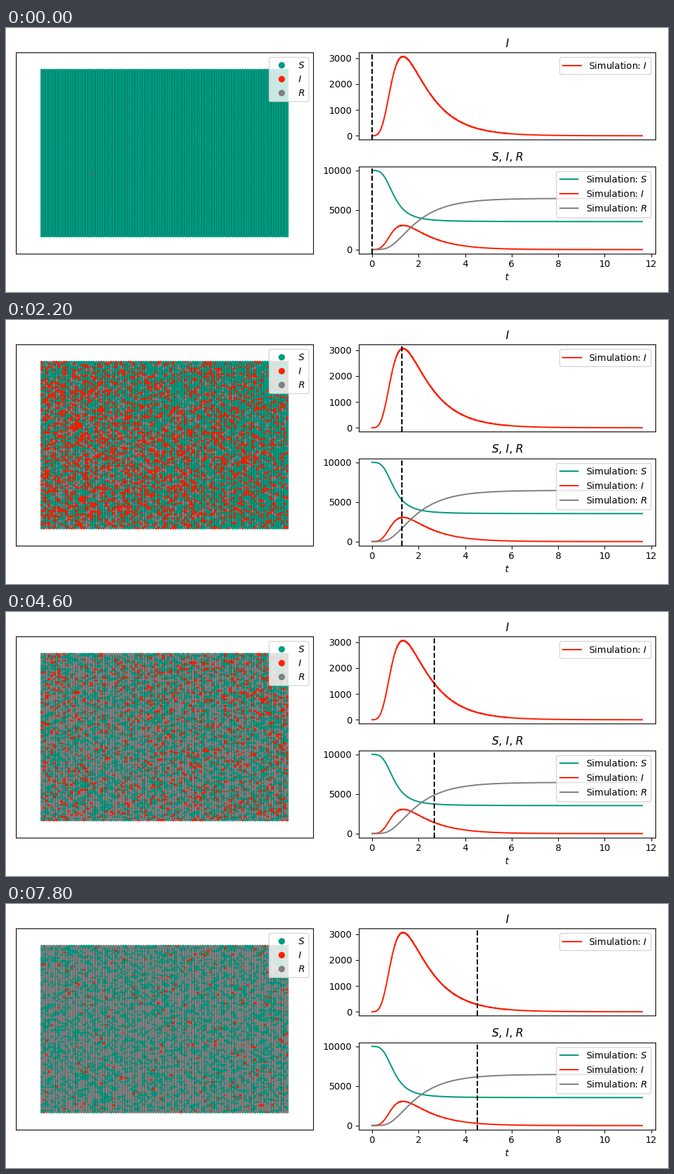
A matplotlib script for the animation above (8 s loop, 1000 by 400 pixels).

```python
import numpy as np
import matplotlib.pyplot as plt
from matplotlib.animation import FuncAnimation
from matplotlib.colors import to_rgba_array
from matplotlib.patches import Rectangle

FRAMES, INTERVAL = 40, 200
SIDE = 100
N = SIDE ** 2
CASES = 6465
T_END = 11.61
STEP = T_END / 100
GREEN, RED, GRAY = "#009a80", "#ff2000", "gray"
STATES = (("$S$", GREEN), ("$I$", RED), ("$R$", GRAY))
SEED_X, SEED_Y = 20, 37

rng = np.random.default_rng(5)


def epidemic(samples=4001, mid=.95, steep=3.35, recovery=.98):
    """Cases grow log-logistically; the infected recover at a constant rate."""
    t = np.linspace(0, T_END, samples)
    rise = t ** steep / (t ** steep + mid ** steep)
    total = 1 + (CASES - 1) * rise
    removed = np.zeros(samples)
    for i in range(1, samples):
        infected = total[i - 1] - removed[i - 1]
        removed[i] = removed[i - 1] + recovery * infected * (t[i] - t[i - 1])
    return t, total, removed


def node_times(t, total):
    """Position, infection time and recovery time of every node."""
    x, y = np.divmod(np.arange(N), SIDE)
    seed = SEED_X * SIDE + SEED_Y
    dist = np.hypot(x - SEED_X, y - SEED_Y) / SIDE
    score = dist + rng.normal(0, .5, N)
    score[rng.permutation(N)[CASES:]] = np.inf
    score[seed] = -np.inf

    order = np.argsort(score)[:CASES]
    caught = np.full(N, np.inf)
    caught[order] = np.interp(np.arange(CASES) + .5, total, t)
    healed = caught + rng.exponential(1, N)

    # Overlapping nodes are stacked in random order, the seed lowest.
    stack = rng.permutation(N)
    stack = np.r_[seed, stack[stack != seed]]
    return x[stack], y[stack], caught[stack], healed[stack]


t, total, removed = epidemic()
x, y, caught, healed = node_times(t, total)
infected = total - removed
infected = np.maximum(infected + rng.normal(0, .12, len(t)) * np.sqrt(infected), 0)
series = dict(zip("SIR", (N - total, infected, removed)))

fig = plt.figure(figsize=(10, 4), dpi=100, facecolor="white")
grid = fig.add_gridspec(2, 2)

# Network: dense links show as black between the nodes.
net = fig.add_subplot(grid[:, 0])
net.add_patch(Rectangle((0, 0), SIDE - 1, SIDE - 1, fc="black", ec="none", zorder=1))
nodes = net.scatter(x, y, s=2, c=[GREEN] * N, linewidths=1.5, zorder=2)
for label, color in STATES:
    net.plot([], [], "o", color=color, label=label)
pad = .105 * (SIDE - 1)
limits = -pad, SIDE - 1 + pad
net.set(xticks=[], yticks=[], xlim=limits, ylim=limits)
net.legend(loc="upper right")


def time_plot(row, names):
    ax = fig.add_subplot(grid[row, 1])
    for label, color in STATES:
        name = label.strip("$")
        if name in names:
            ax.plot(t, series[name], color=color, label=f"Simulation: {label}")
    ax.set_title(", ".join(f"${name}$" for name in names))
    ax.set_xlim(-.05 * T_END, 1.05 * T_END)
    ax.legend(loc="upper right")
    return ax, ax.axvline(0, color="black", ls="--")


top, top_cursor = time_plot(0, "I")
low, low_cursor = time_plot(1, "SIR")
top.set(ylim=(-153, 3213), xticks=[], yticks=range(0, 3001, 1000))
low.set(ylim=(-500, 10499), xticks=range(0, 13, 2), yticks=range(0, 10001, 5000),
        xlabel="$t$")
fig.tight_layout()

palette = to_rgba_array([color for _, color in STATES])


def update(frame):
    now = frame * STEP
    state = (caught <= now).astype(int) + (healed <= now)
    nodes.set_facecolor(palette[state])
    for cursor in (top_cursor, low_cursor):
        cursor.set_xdata([now, now])
    return nodes, top_cursor, low_cursor


anim = FuncAnimation(fig, update, frames=FRAMES, interval=INTERVAL, repeat=True)
plt.show()
```
